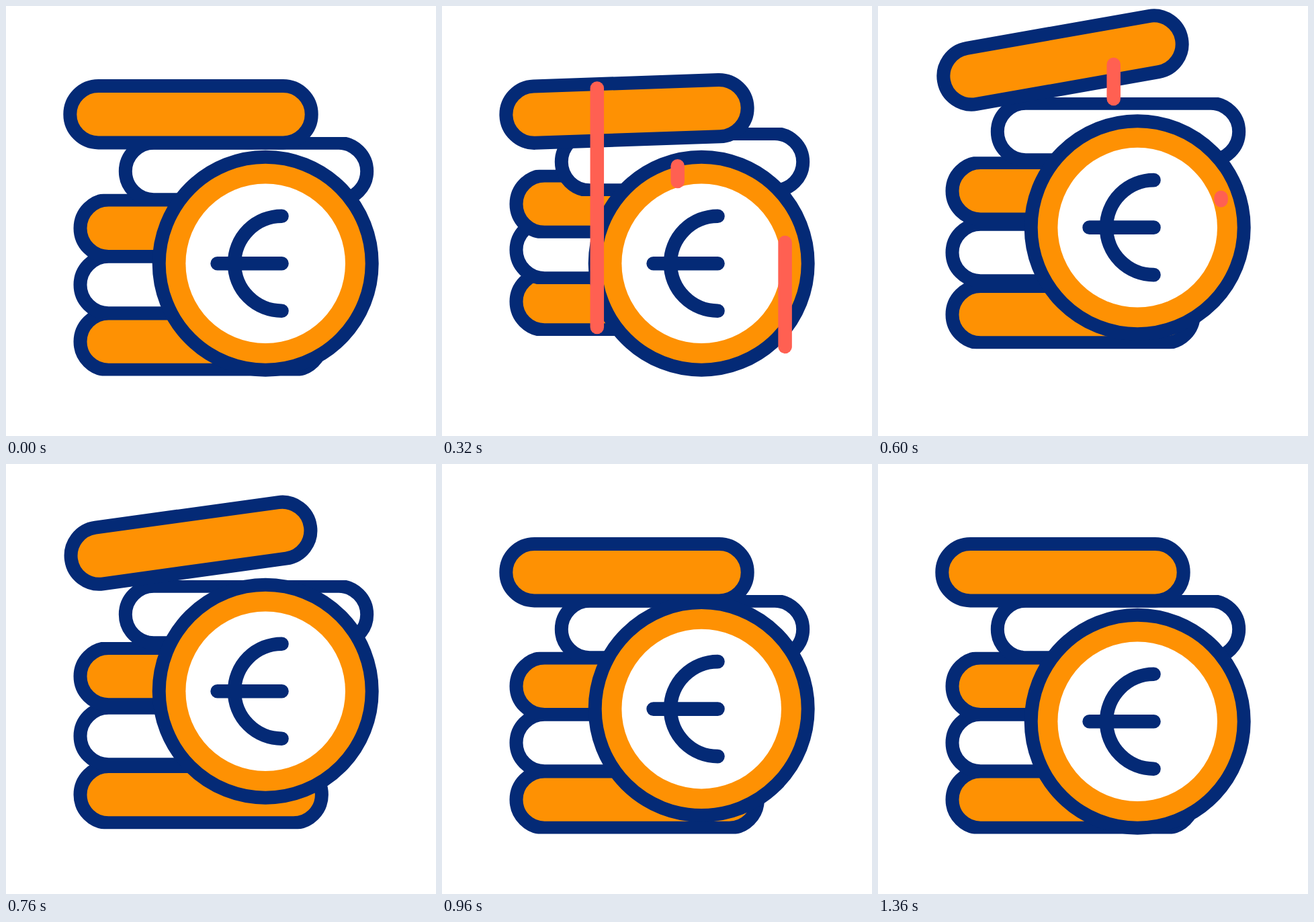
Write an HTML page that moves like this. It is 640 px wide and 640 px high and loops after 2 s.

```html
<!DOCTYPE html>
<html lang="en">
<head>
<meta charset="utf-8">
<title>Coin stack</title>
<style>
  html, body { margin: 0; width: 100%; height: 100%; overflow: hidden; background: #fff; }
  svg { display: block; width: 100vw; height: 100vh; }
  .navy { stroke: #042a76; stroke-width: 20; stroke-linecap: round; }
  .streak { stroke: #ff6052; stroke-width: 20.5; stroke-linecap: round; }
</style>
</head>
<body>
<svg viewBox="0 0 640 640">
  <defs>
    <clipPath id="trim"><rect x="-200" y="-51" width="400" height="102"/></clipPath>
  </defs>
  <g id="bars"></g>
  <g id="coin" fill="none">
    <circle class="navy" r="158.5" fill="#fe9103"/>
    <circle r="118.8" fill="#fff"/>
    <path class="navy" d="M24.3-70.5A70.5 70.5 0 0 0 24.3 70.5M-71.6 0H24.3" style="stroke-width:20.6"/>
  </g>
  <g id="streaks"></g>
</svg>
<script>
const LOOP = 2000, STEP = 40;
const ORANGE = '#fe9103', WHITE = '#fff';
const $ = id => document.getElementById(id);

function add(parent, tag, attrs) {
  const el = document.createElementNS('http://www.w3.org/2000/svg', tag);
  for (const k in attrs) el.setAttribute(k, attrs[k]);
  return parent.appendChild(el);
}

const clamp = x => Math.min(1, Math.max(0, x));
const phase = (t, a, b) => clamp((t - a) / (b - a));
const smooth = p => (1 - Math.cos(Math.PI * p)) / 2;

// Ballistic toss: leaves at a, peaks at b, lands at c
function toss(t, [a, b, c]) {
  const p = t < b ? (b - t) / (b - a) : (t - b) / (c - b);
  return 1 - clamp(p) ** 2;
}

// Bottom bar first, so upper bars overlap lower ones
const bars = [
  { x: 290.2, y: 499.6, fill: ORANGE, rise: 60, air: [0, 350, 788] },
  { x: 290.2, y: 415, fill: WHITE, rise: 60, air: [99, 447, 790] },
  { x: 290.2, y: 330.7, fill: ORANGE, rise: 60, air: [200, 526, 795] },
  { x: 357.5, y: 246, fill: WHITE, rise: 60, air: [285, 569, 809] },
  { x: 275, y: 161.2, fill: ORANGE, rise: 82.5, air: [311, 650, 810], tilt: 10, turn: [287, 600, 700, 830] }
];

for (const b of bars) {
  b.el = add($('bars'), 'g', b.tilt ? {} : { 'clip-path': 'url(#trim)' });
  add(b.el, 'rect', { class: 'navy', x: -179.7, y: -42.2, width: 359.4, height: 84.4, rx: 42.2, fill: b.fill });
}

// Tilt rises, holds, then drops back
function tiltAt(t, { tilt, turn: [a, b, c, d] }) {
  return tilt * (t < c ? toss(t, [a, b, 1e9]) : toss(t, [0, c, d]));
}

const streaks = [
  { x: 230.8, from: 478, to: 122.5, head: [110, 310], tail: [320, 560] },
  { x: 510.6, from: 507, to: 285, head: [194, 394], tail: [345, 625] },
  { x: 350.7, from: 261, to: 87, head: [273, 473], tail: [422, 702] }
];
for (const s of streaks) s.el = add($('streaks'), 'line', { class: 'streak', x1: s.x, x2: s.x });

const coinTosses = [
  { rise: 55.8, air: [400, 650, 900] },
  { rise: 41, air: [900, 1130, 1360] }
];

function draw(t) {
  for (const b of bars) {
    const y = b.y - b.rise * toss(t, b.air);
    const turn = b.tilt ? ` rotate(${-tiltAt(t, b)})` : '';
    b.el.setAttribute('transform', `translate(${b.x} ${y})${turn}`);
  }

  const lift = coinTosses.reduce((sum, c) => sum + c.rise * toss(t, c.air), 0);
  $('coin').setAttribute('transform', `translate(386.2 ${383.2 - lift})`);

  for (const s of streaks) {
    const at = span => s.from + (s.to - s.from) * smooth(phase(t, ...span));
    s.el.setAttribute('y1', at(s.tail));
    s.el.setAttribute('y2', at(s.head));
    s.el.style.display = t > s.head[0] && t < s.tail[1] ? '' : 'none';
  }
}

const start = performance.now();
function tick() {
  const t = (performance.now() - start) % LOOP;
  draw(Math.floor(t / STEP) * STEP);
  requestAnimationFrame(tick);
}
tick();
</script>
</body>
</html>
```
